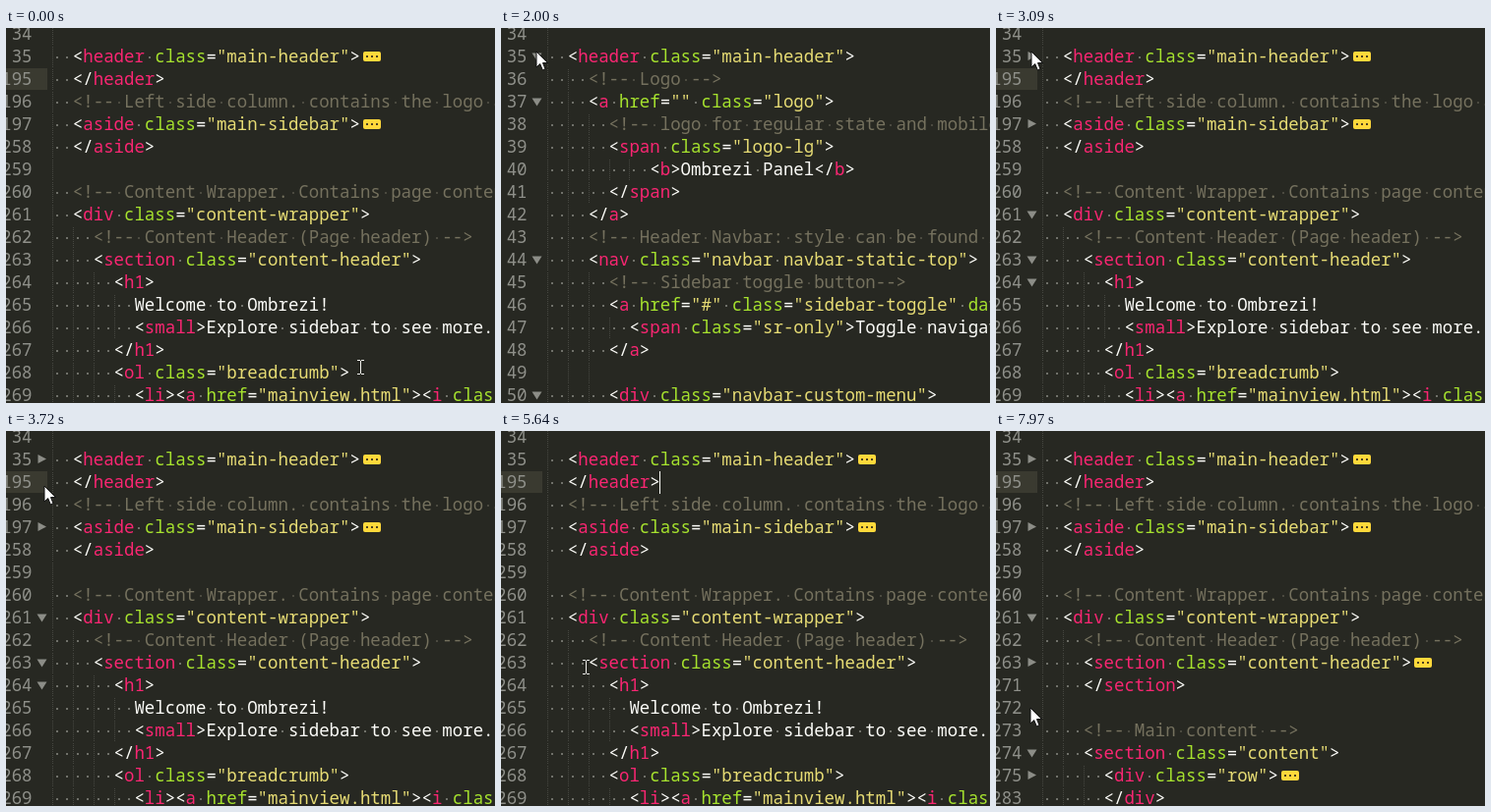
Animation of 497x382 px, one loop 8 s. Source, as an HTML page with a canvas:

```html
<!DOCTYPE html>
<html lang="en">
<head>
<meta charset="utf-8">
<style>
  html, body { margin: 0; width: 100%; height: 100%; overflow: hidden; background: #272822; }
  canvas { display: block; }
</style>
</head>
<body>
<canvas id="stage" width="497" height="382"></canvas>
<script>
const ctx = document.getElementById('stage').getContext('2d');
const LOOP = 8000, ROW = 23, COL = 10.43, LEFT = 47, GUTTER = 42;
const FONT = '500 17.4px "Noto Sans Mono", "DejaVu Sans Mono", monospace';
const COLORS = {
  back: '#272822', active: '#3a3a30', number: '#8f908a', text: '#fcfcf8',
  comment: '#75715e', tag: '#f92672', attr: '#a6e22e', string: '#e6db74',
  space: '#70716a', commentSpace: '#4b4a40', guide: '#464741',
  fold: '#8c8d87', badge: '#ffd93b', badgeDot: '#4d4220', beam: '#f0f0ec'
};

// Each line: number, fold mark (+ closed, - open), code.
const head = `34
35+  <header class="main-header">
195  </header>
196  <!-- Left side column. contains the logo and sidebar -->
197+  <aside class="main-sidebar">
258  </aside>
259
260  <!-- Content Wrapper. Contains page content -->
261-  <div class="content-wrapper">
262    <!-- Content Header (Page header) -->
`;
const folded = parse(head + `263-    <section class="content-header">
264-      <h1>
265        Welcome to Ombrezi!
266        <small>Explore sidebar to see more.</small>
267      </h1>
268      <ol class="breadcrumb">
269        <li><a href="mainview.html"><i class="icon">`);
const sectionFolded = parse(head + `263+    <section class="content-header">
271    </section>
272
273    <!-- Main content -->
274-    <section class="content">
275+      <div class="row">
283      </div>`);
const headerOpen = parse(`34
35-  <header class="main-header">
36    <!-- Logo -->
37-    <a href="" class="logo">
38      <!-- logo for regular state and mobile devices -->
39      <span class="logo-lg">
40          <b>Ombrezi Panel</b>
41      </span>
42    </a>
43    <!-- Header Navbar: style can be found in header -->
44-    <nav class="navbar navbar-static-top">
45      <!-- Sidebar toggle button-->
46      <a href="#" class="sidebar-toggle" data-toggle="menu">
47        <span class="sr-only">Toggle navigation</span>
48      </a>
49
50-      <div class="navbar-custom-menu">`);

// Pointer path: time, x, y
const path = [
  [70, 360, 345], [840, 8, 24], [920, 9, 23], [1070, 31, 24], [1390, 31, 24],
  [1450, 36, 24], [3470, 36, 24], [3720, 39, 56], [4150, 42, 75], [4700, 110, 120],
  [5300, 100, 225], [5640, 86, 240], [5830, 40, 236], [6340, 32, 235],
  [7660, 32, 235], [7970, 35, 282]
];

function parse(source) {
  const lines = source.split('\n').map(line => {
    const [, number, fold, code] = line.match(/^(\d+)([+-]?)(.*)$/);
    return { number, fold, code, colors: highlight(code), indent: code.search(/\S|$/) };
  });
  // Blank lines carry the guides of the line below.
  lines.forEach((line, i) => { if (!line.code) line.indent = lines[i + 1].indent; });
  return lines;
}

function highlight(code) {
  const colors = Array(code.length).fill(COLORS.text);
  const token = /(?<comment><!--.*)|(?<string>"[^"]*")|(?<=<\/?)(?<tag>\w+)|(?<attr>[\w-]+)(?==)/g;
  for (const match of code.matchAll(token)) {
    const kind = Object.keys(match.groups).find(name => match.groups[name]);
    colors.fill(COLORS[kind], match.index, match.index + match[0].length);
  }
  return colors;
}

const ramp = (t, start, length) => Math.min(1, Math.max(0, (t - start) / length));

function rect(color, x, y, w, h) {
  ctx.fillStyle = color;
  ctx.fillRect(x, y, w, h);
}

function polygon(points, fill, stroke) {
  ctx.beginPath();
  points.forEach(([x, y]) => ctx.lineTo(x, y));
  ctx.closePath();
  ctx.fillStyle = fill;
  ctx.fill();
  if (stroke) {
    ctx.strokeStyle = stroke;
    ctx.lineWidth = 1;
    ctx.stroke();
  }
}

// Every glyph sits on the column grid.
function write(text, x, baseline, colorAt) {
  [...text].forEach((char, i) => {
    ctx.fillStyle = colorAt(i);
    ctx.fillText(char, x + i * COL, baseline);
  });
}

function drawBadge(x, mid) {
  ctx.fillStyle = COLORS.badge;
  ctx.beginPath();
  ctx.roundRect(x, mid - 5, 18, 10, 2);
  ctx.fill();
  for (const dx of [3, 8, 13]) rect(COLORS.badgeDot, x + dx, mid - 1, 2, 2);
}

function drawLine(line, row, foldAlpha) {
  const top = row * ROW - 5, mid = top + 11, baseline = top + 17;
  if (line.number === '195') rect(COLORS.active, 0, top, GUTTER, ROW - 1);
  write(line.number, 26.5 - line.number.length * COL, baseline, () => COLORS.number);

  for (let col = 0; col < line.indent; col += 2) {
    const x = Math.round(LEFT + col * COL);
    for (let y = top + 1; y < top + ROW; y += 2) rect(COLORS.guide, x, y, 1, 1);
  }
  [...line.code].forEach((char, i) => {
    if (char !== ' ') return;
    const color = line.colors[i] === COLORS.comment ? COLORS.commentSpace : COLORS.space;
    rect(color, Math.round(LEFT + i * COL + 4), mid, 2, 2);
  });
  write(line.code, LEFT, baseline, i => line.colors[i]);

  if (line.fold === '+') drawBadge(Math.round(LEFT + line.code.length * COL + 3), mid);
  if (line.fold) {
    ctx.globalAlpha = foldAlpha;
    polygon(line.fold === '+'
      ? [[32.5, mid - 5], [41, mid - 0.5], [32.5, mid + 4]]
      : [[31.5, mid - 3.5], [41.5, mid - 3.5], [36.5, mid + 4.5]], COLORS.fold);
    ctx.globalAlpha = 1;
  }
}

function pointerAt(t) {
  const next = path.findIndex(key => key[0] > t);
  if (next === 0) return path[0].slice(1);
  if (next < 0) return path[path.length - 1].slice(1);
  const [t0, x0, y0] = path[next - 1], [t1, x1, y1] = path[next];
  const p = (t - t0) / (t1 - t0), eased = p * p * (3 - 2 * p);
  return [x0 + (x1 - x0) * eased, y0 + (y1 - y0) * eased].map(Math.round);
}

function drawPointer(x, y) {
  ctx.save();
  ctx.translate(x, y);
  if (x <= GUTTER) {
    polygon([[0, 0], [0, 16], [3.7, 12.6], [6.3, 18.8], [9, 17.7], [6.5, 11.6], [11.5, 11.6]],
      '#fff', '#111');
  } else {
    rect(COLORS.beam, 0, -6, 1, 13);
    for (const dy of [-7, 7]) {
      rect(COLORS.beam, -3, dy, 3, 1);
      rect(COLORS.beam, 1, dy, 3, 1);
    }
  }
  ctx.restore();
}

function caretAlpha(t) {
  if (t < 4200) return 0;
  const phase = t % 1000;
  return ramp(phase, 200, 300) - ramp(phase, 650, 60);
}

function draw(t) {
  const opened = t >= 2000 && t < 3090;
  const lines = opened ? headerOpen : t >= 6680 ? sectionFolded : folded;
  const foldAlpha = ramp(t, 670, 150) - ramp(t, 4150, 250) + ramp(t, 5810, 150);

  rect(COLORS.back, 0, 0, 497, 382);
  ctx.font = FONT;
  lines.forEach((line, row) => drawLine(line, row, foldAlpha));

  ctx.globalAlpha = caretAlpha(t);
  rect(COLORS.text, 161, 41, 1, ROW);
  ctx.globalAlpha = 1;
  drawPointer(...pointerAt(t));
}

const start = performance.now();
function tick() {
  draw((performance.now() - start) % LOOP);
  requestAnimationFrame(tick);
}
tick();
</script>
</body>
</html>
```
